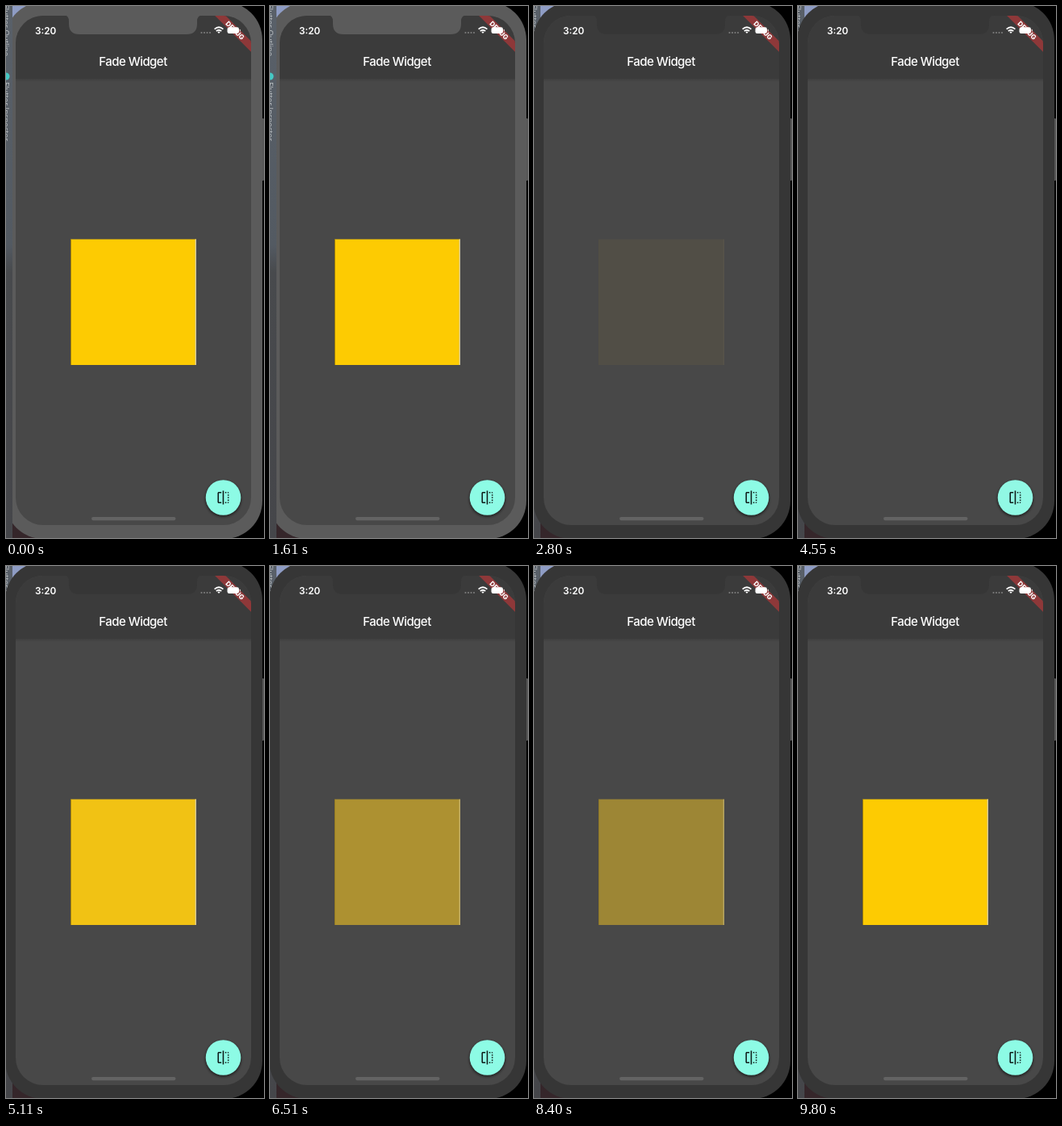
Recreate the animation shown at these times as an HTML page. Size 320x658 px, loop 9870 ms.

```html
<!DOCTYPE html>
<html lang="en">
<head>
<meta charset="utf-8">
<title>Fade Widget</title>
<style>
  html, body { margin: 0; width: 100%; height: 100%; overflow: hidden; background: #000; }
  svg { display: block; width: 100%; height: 100%; }
  text { font-family: Inter, Roboto, sans-serif; fill: #fff; }
  .side text { font: 9.5px "Open Sans", sans-serif; fill: #c3c7ca; }
</style>
</head>
<body>
<svg viewBox="0 0 320 658">
  <defs>
    <clipPath id="screenClip"><rect x="12" y="12" width="292" height="630" rx="34"/></clipPath>
    <linearGradient id="sideFill" x2="0" y2="1">
      <stop offset="0" stop-color="#596069"/>
      <stop offset=".45" stop-color="#535a62"/>
      <stop offset=".5" stop-color="#484a4d"/>
      <stop offset="1" stop-color="#45464a"/>
    </linearGradient>
    <linearGradient id="barShadow" x2="0" y2="1">
      <stop offset="0" stop-opacity=".12"/>
      <stop offset="1" stop-opacity="0"/>
    </linearGradient>
    <filter id="soft" x="-30%" y="-30%" width="160%" height="160%">
      <feGaussianBlur stdDeviation="1.6"/>
    </filter>
    <g id="sidebar" class="side">
      <rect width="8" height="658" fill="url(#sideFill)"/>
      <text transform="translate(-3 62) rotate(90)" text-anchor="end">Flutter Outline</text>
      <circle cx="0" cy="87" r="4.5" fill="#45c8c4"/>
      <text transform="translate(-3 94) rotate(90)">Flutter Inspector</text>
    </g>
  </defs>

  <!-- desktop behind the phone -->
  <rect width="320" height="658"/>
  <rect width="40" height="60" fill="#8e9cc4"/>
  <rect y="600" width="40" height="58" fill="#35262a"/>
  <use href="#sidebar"/>

  <!-- phone body -->
  <rect x="316" y="139" width="4" height="77" rx="1" fill="#565656"/>
  <rect class="bezel" x="-1" y="-5" width="319" height="664" rx="47"/>
  <use id="sidebarFront" href="#sidebar"/>

  <g clip-path="url(#screenClip)">
    <rect x="12" y="12" width="292" height="630" fill="#484848"/>
    <rect x="12" y="12" width="292" height="78" fill="#3b3b3b"/>
    <rect x="12" y="90" width="292" height="4" fill="url(#barShadow)"/>

    <rect id="box" x="80" y="288.5" width="156" height="155.500"/>
    <g id="boxEdges">
      <path d="M80.5 288.5v155.500" stroke="#7c6309" stroke-opacity=".7"/>
      <path d="M235.3 288.5v155.500" stroke="#d8cb9a" stroke-width="1.4"/>
    </g>

    <g transform="translate(282.6 28.8) rotate(45)">
      <rect x="-45" y="-4.7" width="90" height="9.4" fill="#8e3839"/>
      <text x="2" y="3" text-anchor="middle" font-size="8.3" font-weight="800">DEBUG</text>
    </g>
  </g>
  <path class="bezel" d="M71 11h174q-8 0-8 8v3q0 13-13 13H91q-13 0-13-13v-3q0-8-7-8z"/>

  <!-- status bar -->
  <text x="36" y="34.5" font-size="11.8" font-weight="600">3:20</text>
  <g fill="#7c7c7c">
    <circle cx="242.5" cy="33" r="1.1"/><circle cx="246" cy="33" r="1.1"/>
    <circle cx="249.5" cy="33" r="1.1"/><circle cx="253" cy="33" r="1.1"/>
  </g>
  <g fill="none" stroke="#fff" stroke-width="1.8">
    <path d="M258.6 28.6q5.4-4.6 10.8 0"/>
    <path d="M260.8 31q3.2-2.6 6.4 0"/>
    <path d="M262.4 32.2q1.6-1.2 3.2 0L264 34z" fill="#fff" stroke="none"/>
  </g>
  <rect x="274.5" y="26.300" width="14.5" height="7.8" rx="2.4" fill="#fff"/>
  <rect x="289.8" y="28.7" width="1.2" height="3" rx=".6" fill="#cfc4c4"/>

  <text x="157.5" y="73.7" text-anchor="middle" font-size="15" font-weight="500" letter-spacing="-.55">Fade Widget</text>

  <!-- floating button -->
  <circle cx="269.5" cy="609.5" r="22.5" fill-opacity=".5" filter="url(#soft)"/>
  <circle cx="269.5" cy="608" r="21.8" fill="#8dfbe5"/>
  <circle id="splash" cx="269.5" cy="608" r="21.8" fill="#ccc"/>
  <path transform="translate(260.1 598.7) scale(.779)" fill="#101c1a" d="M15 21h2v-2h-2v2zm4-12h2V7h-2v2zM3 5v14c0 1.1.9 2 2 2h4v-2H5V5h4V3H5c-1.1 0-2 .9-2 2zm16-2v2h2c0-1.1-.9-2-2-2zm-8 20h2V1h-2v22zm8-6h2v-2h-2v2zM15 5h2V3h-2v2zm4 8h2v-2h-2v2zm0 8c1.1 0 2-.9 2-2h-2v2z"/>
  <rect x="106" y="632" width="104.500" height="4.200" rx="2.1" fill="#636363"/>
</svg>

<script>
const LOOP = 9870;
const FADE = 500;
const FOCUS_AT = 2230;
const TAPS = [2325, 4645, 6290, 8165];
const GRAY = 72;

const box = document.getElementById('box');
const boxEdges = document.getElementById('boxEdges');
const splash = document.getElementById('splash');
const sidebarFront = document.getElementById('sidebarFront');
const bezels = document.querySelectorAll('.bezel');
const clamp = v => Math.min(1, Math.max(0, v));
const mix = (a, b, p) => a + (b - a) * p;

// Each tap toggles the box: even taps hide it, odd taps show it.
function boxOpacity(t) {
  return TAPS.reduce((sum, tap, i) => {
    const progress = clamp((t - tap) / FADE);
    return sum + (i % 2 ? progress : -progress);
  }, 1);
}

// Blend of amber over the gray screen; blue falls off non-linearly.
function boxColor(p) {
  const blue = mix(2, GRAY, Math.sqrt(1 - p));
  return `rgb(${mix(GRAY, 253, p)}, ${mix(GRAY, 203, p)}, ${blue})`;
}

// The button lightens while pressed and recovers after release.
function pressAmount(t) {
  return Math.max(...TAPS.map(tap =>
    Math.min(clamp((t - tap + 120) / 90), clamp((tap + 220 - t) / 220))));
}

function draw(now) {
  const t = now % LOOP;
  const focused = t >= FOCUS_AT;
  const opacity = clamp(boxOpacity(t));
  box.setAttribute('fill', boxColor(opacity));
  boxEdges.setAttribute('opacity', opacity);
  splash.setAttribute('opacity', 0.2 * pressAmount(t));
  sidebarFront.setAttribute('visibility', focused ? 'hidden' : 'visible');
  bezels.forEach(b => b.setAttribute('fill', focused ? '#363636' : '#5b5b5b'));
  requestAnimationFrame(draw);
}
draw(performance.now());
</script>
</body>
</html>
```
